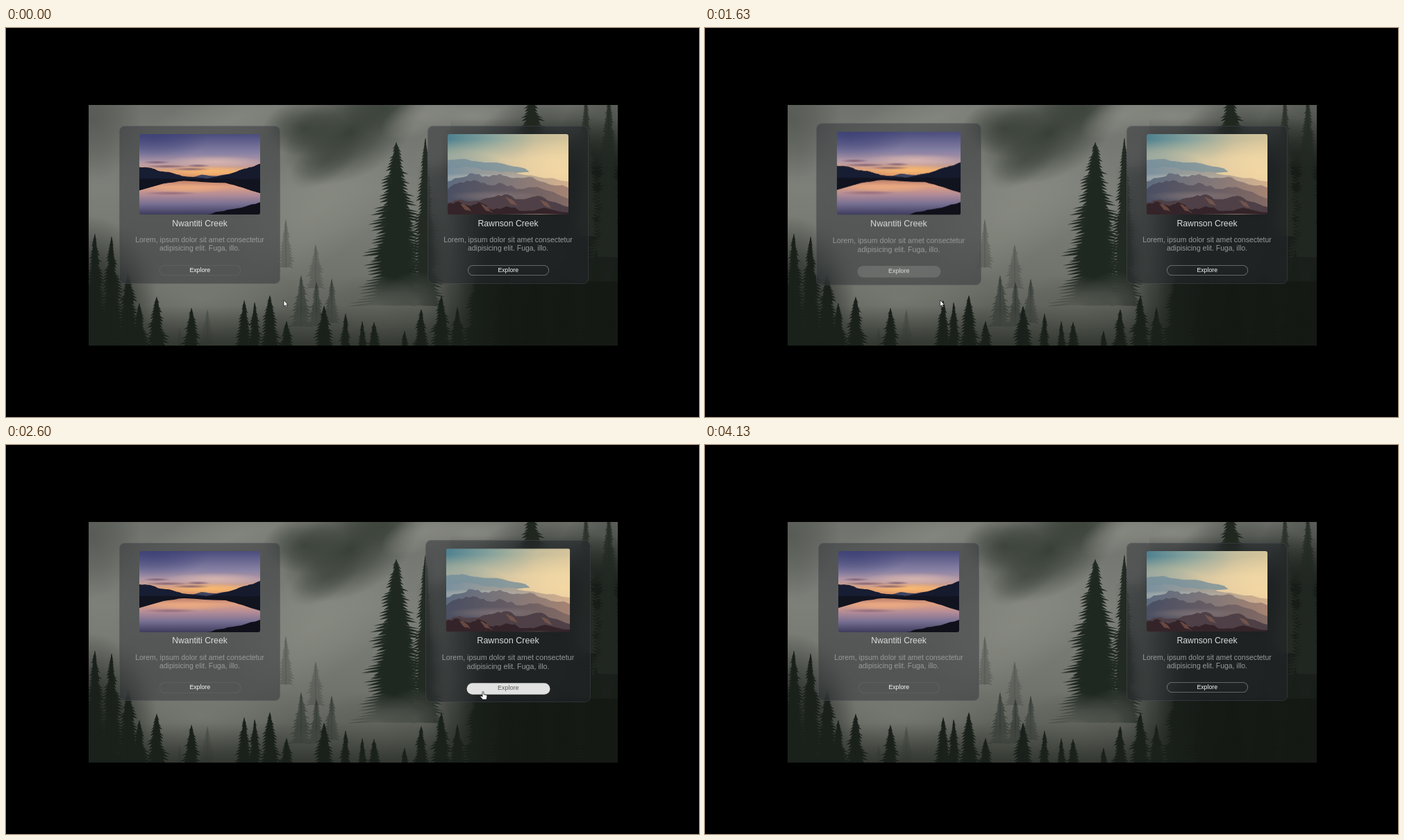
Recreate the animation shown at these times as an HTML page with a canvas. Size 998 px wide and 561 px high, loop 4160 ms.

```html
<!DOCTYPE html>
<html lang="en">
<head>
<meta charset="utf-8">
<title>Creek cards</title>
<style>
html, body { margin: 0; width: 100%; height: 100%; overflow: hidden; background: #000; }
body { position: relative; font-family: Arial, "Liberation Sans", sans-serif; }
#stage { position: absolute; left: 119px; top: 110.5px; width: 762px; height: 347px; overflow: hidden; }
#stage > canvas { position: absolute; left: 0; top: 0; }
.card {
  position: absolute; top: 30px; width: 232px; height: 228px; border-radius: 8px;
  background: rgba(37, 39, 47, .42); backdrop-filter: blur(10px);
  box-shadow: inset 0 0 0 .7px rgba(160, 165, 180, .2); text-align: center;
}
.card > * { position: absolute; margin: 0; font-weight: 400; }
.card canvas { left: 28.8px; top: 12.3px; width: 174.5px; height: 116.5px; border-radius: 3px; }
h3 { left: 0; right: 0; top: 134.2px; font-size: 12.25px; line-height: 14px; color: #dcdddf; }
p { left: 0; right: 0; top: 159.8px; font-size: 10.45px; line-height: 12px; color: #999a9b; }
.button {
  left: 58px; top: 201px; width: 116.5px; height: 15.6px; border-radius: 8px;
  font-size: 8.75px; line-height: 15.6px;
}
#cursor { position: absolute; left: 0; top: 0; width: 14px; height: 16px; overflow: visible; }
#cursor path { fill: #fff; stroke: #111; stroke-width: .7; }
</style>
</head>
<body>
<div id="stage">
  <canvas id="forest" width="762" height="347"></canvas>
  <div class="card" style="left:44px">
    <canvas id="lake" width="350" height="234"></canvas>
    <h3>Nwantiti Creek</h3>
    <p>Lorem, ipsum dolor sit amet consectetur<br>adipisicing elit. Fuga, illo.</p>
    <div class="button">Explore</div>
  </div>
  <div class="card" style="left:488px">
    <canvas id="ridges" width="350" height="234"></canvas>
    <h3>Rawnson Creek</h3>
    <p>Lorem, ipsum dolor sit amet consectetur<br>adipisicing elit. Fuga, illo.</p>
    <div class="button">Explore</div>
  </div>
  <svg id="cursor">
    <path id="arrow" d="M0 0V9L2 7.2 3.4 10.3 4.8 9.7 3.5 6.7H6.2Z"/>
    <path id="hand" d="M-1 .8Q0-.6 1 .8V4.2L5 5Q6 5.3 5.8 7L5 11.5H-.6L-3.8 7.4Q-3.6 6-2.4 6.4L-1 7.6Z"/>
  </svg>
</div>
<script>
const $ = id => document.getElementById(id);
let seed = 7;
const random = () => (seed = seed * 16807 % 2147483647) / 2147483647;

function gradient(c, x0, y0, x1, y1, stops) {
  const g = c.createLinearGradient(x0, y0, x1, y1);
  stops.forEach(([at, color]) => g.addColorStop(at, color));
  return g;
}

function fill(c, style, x, y, w, h) {
  c.fillStyle = style;
  c.fillRect(x, y, w, h);
}

// Soft ellipse fading out to its edge
function blob(c, x, y, rx, ry, rgb, alpha, turn = 0) {
  c.save();
  c.translate(x, y);
  c.rotate(turn);
  c.scale(rx, ry);
  const g = c.createRadialGradient(0, 0, 0, 0, 0, 1);
  g.addColorStop(0, `rgba(${rgb},${alpha})`);
  g.addColorStop(.5, `rgba(${rgb},${alpha * .6})`);
  g.addColorStop(1, `rgba(${rgb},0)`);
  fill(c, g, -1, -1, 2, 2);
  c.restore();
}

function tree(c, x, top, base, half, color) {
  const rows = Math.round((base - top) / 4.5);
  c.fillStyle = color;
  for (const side of [-1, 1]) {
    c.beginPath();
    c.moveTo(x - side * .6, top);
    for (let i = 1; i <= rows; i++) {
      const y = top + (base - top) * i / rows;
      const w = half * (i / rows) ** .8 * (.6 + .5 * random());
      c.lineTo(x + side * w, y + 1);
      c.lineTo(x + side * w * .5, y - .5);
    }
    c.lineTo(x - side * .6, base);
    c.fill();
  }
}

function drawForest() {
  const c = $("forest").getContext("2d");
  const fog = "137,139,131", dark = "22,27,23", green = "52,60,51";
  c.translate(-119, -110.5);
  fill(c, gradient(c, 0, 111, 0, 458, [[0, "#70736d"], [.35, "#7d8079"], [.7, "#71746c"], [1, "#4c5049"]]), 119, 110, 762, 348);
  blob(c, 125, 130, 70, 90, "70,74,69", .6);
  blob(c, 330, 130, 150, 45, fog, .7, -.3);
  blob(c, 450, 255, 150, 75, fog, .8, -.6);
  blob(c, 280, 390, 130, 60, fog, .45);
  blob(c, 430, 145, 60, 40, green, .8);
  blob(c, 495, 150, 105, 65, green, .95, -.5);
  blob(c, 545, 115, 60, 40, green, .7);
  blob(c, 460, 190, 60, 30, green, .45, -.6);
  blob(c, 600, 125, 65, 28, fog, .8, -.4);
  blob(c, 670, 125, 80, 28, fog, .85);
  blob(c, 118, 400, 100, 130, dark, .95);

  for (const [x, top, base, half] of [[403, 275, 345, 14], [446, 312, 375, 18], [290, 405, 462, 14], [250, 432, 462, 8]])
    tree(c, x, top, base, half, "rgba(66,72,65,.4)");
  for (const [x, top, base, half] of [[425, 356, 430, 20], [447, 366, 430, 16], [469, 361, 425, 15]])
    tree(c, x, top, base, half, "rgba(46,53,47,.62)");
  blob(c, 440, 430, 60, 25, "95,98,90", .5);

  // Dark slope on the right
  fill(c, gradient(c, 590, 0, 690, 0, [[0, "rgba(22,27,23,0)"], [1, "rgba(22,27,23,.93)"]]), 590, 200, 300, 258);
  fill(c, gradient(c, 0, 130, 0, 215, [[0, "rgba(24,29,25,0)"], [1, "rgba(24,29,25,.9)"]]), 640, 130, 250, 80);
  blob(c, 775, 210, 120, 110, dark, .95);
  blob(c, 870, 240, 90, 170, dark, .85);
  tree(c, 757, 88, 250, 50, "#20271f");
  tree(c, 835, 96, 300, 26, "rgba(40,46,38,.8)");
  tree(c, 868, 100, 330, 34, "rgba(34,40,34,.8)");

  tree(c, 604, 158, 400, 30, "#222a23");
  tree(c, 562, 164, 400, 66, "#222b24");
  tree(c, 562, 172, 380, 44, "#1e2720");
  blob(c, 530, 405, 75, 50, "96,99,91", .95);
  blob(c, 590, 395, 50, 45, "88,92,84", .7);
  fill(c, gradient(c, 0, 400, 0, 458, [[0, "rgba(38,43,37,0)"], [1, "rgba(38,43,37,.65)"]]), 119, 400, 762, 58);

  for (const [x, top, base, half] of [
    [128, 296, 470, 32], [152, 300, 470, 30], [176, 352, 470, 30], [192, 396, 470, 20],
    [217, 387, 462, 22], [267, 403, 464, 18], [343, 392, 464, 17], [358, 395, 464, 15],
    [380, 385, 464, 22], [404, 422, 466, 16], [458, 400, 464, 20], [489, 411, 464, 12],
    [513, 422, 464, 10], [530, 423, 464, 13], [574, 436, 464, 9], [598, 405, 464, 17],
    [627, 385, 464, 22], [650, 402, 464, 18], [682, 340, 470, 36]
  ]) tree(c, x, top, base, half, "#1a211b");
  for (const [x, top] of [[720, 335], [760, 350], [805, 330], [850, 320], [878, 340]])
    tree(c, x, top, 475, 36, "#181e18");
  fill(c, gradient(c, 650, 0, 740, 0, [[0, "rgba(19,23,18,0)"], [1, "rgba(19,23,18,.75)"]]), 650, 365, 235, 95);
}

// Filled outline through [x, y] points, with small seeded bumps between them
function land(c, points, color, bump = 1) {
  c.fillStyle = color;
  c.beginPath();
  points.forEach(([x, y], i) => {
    if (!i) return c.moveTo(x, y);
    const [px, py] = points[i - 1];
    for (let k = 1; k <= 4; k++)
      c.lineTo(px + (x - px) * k / 4, py + (y - py) * k / 4 + (k < 4 ? (random() - .5) * bump : 0));
  });
  c.fill();
}

function photo(id) {
  const c = $(id).getContext("2d");
  c.scale(2, 2);
  return c;
}

function drawLake() {
  const c = photo("lake");
  fill(c, gradient(c, 0, 0, 0, 66, [[0, "#4b4d7e"], [.4, "#8680a4"], [.65, "#b79ba6"], [.83, "#e3a577"], [1, "#d98b5c"]]), 0, 0, 175, 66);
  blob(c, 20, 5, 80, 35, "50,56,110", .55);
  blob(c, 110, 40, 70, 9, "235,196,180", .65);
  blob(c, 105, 54, 60, 8, "255,190,110", .8);
  for (const [x, y, r] of [[40, 47, 32], [75, 51, 28], [25, 41, 20], [85, 46, 18]])
    blob(c, x, y, r, 2.4, "112,80,104", .75);
  fill(c, gradient(c, 0, 66, 0, 117, [[0, "#b87a62"], [.2, "#e0a184"], [.45, "#b08b98"], [.7, "#777093"], [1, "#3e3c5e"]]), 0, 66, 175, 51);
  blob(c, 70, 79, 65, 7, "242,176,126", .7);
  blob(c, 45, 86, 40, 3, "125,88,110", .6);
  land(c, [[60, 67], [90, 59], [112, 61], [140, 57], [175, 67]], "#3d435e");
  land(c, [[0, 67], [0, 48], [16, 49], [30, 54], [46, 56], [62, 61], [95, 64], [95, 67]], "#171d32");
  land(c, [[80, 67], [106, 63], [130, 58], [150, 51], [162, 48], [175, 43], [175, 69]], "#151a2d");
  land(c, [[0, 65], [80, 65.5], [175, 65], [175, 86], [150, 78], [125, 71], [65, 68], [35, 72], [0, 82]], "#11131f");
  land(c, [[98, 117], [122, 112], [148, 107], [175, 99], [175, 117]], "#10101a", 2);
}

function drawRidges() {
  const c = photo("ridges");
  fill(c, gradient(c, 0, 0, 175, 40, [[0, "#4f8190"], [.35, "#87a39d"], [.7, "#c5bd9c"], [1, "#d8c69b"]]), 0, 0, 175, 117);
  fill(c, gradient(c, 0, 8, 0, 75, [[0, "rgba(236,210,165,0)"], [.45, "rgba(236,210,165,.75)"], [1, "rgba(221,190,154,.9)"]]), 0, 8, 175, 109);
  blob(c, 165, 55, 80, 50, "247,220,166", .8);
  blob(c, 0, 50, 90, 28, "118,149,160", .75);
  const haze = (top, bottom) => gradient(c, 0, 35, 175, 100, [[0, top], [1, bottom]]);
  land(c, [[0, 38], [22, 36], [45, 40], [80, 43], [112, 50], [118, 55], [0, 60]], "rgba(112,139,154,.75)", 2);
  land(c, [[0, 50], [25, 47], [60, 53], [95, 55], [130, 62], [175, 69], [175, 90], [0, 90]], haze("#7790a0", "#d9b18b"), 3);
  blob(c, 45, 64, 80, 7, "184,187,181", .75);
  land(c, [[0, 69], [20, 63], [36, 57], [55, 61], [76, 58], [95, 64], [118, 62], [140, 70], [175, 78], [175, 117], [0, 117]], haze("#586a80", "#a88472"), 4);
  land(c, [[0, 80], [18, 70], [38, 67], [58, 74], [80, 72], [105, 80], [130, 77], [175, 94], [175, 117], [0, 117]], haze("#454d63", "#846b65"), 4);
  blob(c, 70, 90, 70, 8, "148,132,130", .5);
  land(c, [[0, 99], [20, 95], [40, 97], [65, 92], [82, 88], [103, 95], [130, 90], [150, 98], [175, 106], [175, 117], [0, 117]], "#4e4046", 4);
  land(c, [[0, 102], [16, 98], [30, 104], [45, 99], [66, 110], [85, 105], [110, 112], [140, 107], [175, 114], [175, 117], [0, 117]], "#342429", 4);
  for (const [x, y] of [[18, 101], [48, 102], [84, 92], [133, 95]])
    land(c, [[x, y], [x + 10, y + 4], [x + 18, y + 13], [x + 7, y + 9]], "rgba(138,98,82,.6)", 2);
}

const LOOP = 4160;
// time, x, y of the pointer tip
const path = [[0, 400, 392], [30, 400, 392], [340, 297, 350], [1470, 297, 350], [1630, 338, 392],
  [2070, 630, 405], [2300, 630, 405], [2420, 687, 355], [3500, 687, 355], [3700, 727, 419], [3850, 748, 470]];
// rise start, rise end, fall start, fall end
const lifts = [[195, 450, 1600, 1930], [2380, 2590, 3580, 3900]];
const glows = [[270, 510, 1480, 1680], [2410, 2620, 3540, 3745]];

const ramp = (t, a, b) => {
  const k = Math.min(1, Math.max(0, (t - a) / (b - a)));
  return k * k * (3 - 2 * k);
};
const pulse = (t, [a, b, c, d]) => ramp(t, a, b) - ramp(t, c, d);
const mix = (a, b, k) => a + (b - a) * k;

function pointer(t) {
  const i = path.findIndex(p => p[0] > t);
  if (i < 0) return path[path.length - 1].slice(1);
  const [t0, x0, y0] = path[i - 1], [t1, x1, y1] = path[i];
  const k = (t - t0) / (t1 - t0);
  return [mix(x0, x1, k), mix(y0, y1, k)];
}

const cards = [...document.querySelectorAll(".card")];
const buttons = [...document.querySelectorAll(".button")];

function frame(now) {
  const t = now % LOOP;
  cards.forEach((card, i) => {
    const lift = pulse(t, lifts[i]), glow = pulse(t, glows[i]);
    card.style.transform = `translateY(${-lift}px) scale(${1 + .026 * lift})`;
    const ink = mix(250, 88, glow);
    const edge = i ? "150,152,155" : "122,123,122";
    buttons[i].style.color = `rgb(${ink},${ink},${ink})`;
    buttons[i].style.background = `rgba(236,236,236,${.97 * glow})`;
    buttons[i].style.boxShadow = `inset 0 0 0 .8px rgba(${edge},${(i ? .75 : .35) * (1 - glow)})`;
  });
  const [x, y] = pointer(t);
  const pressing = y < 358.5;
  $("cursor").style.transform = `translate(${x - 119}px,${y - 110.5}px)`;
  $("arrow").style.display = pressing ? "none" : "";
  $("hand").style.display = pressing ? "" : "none";
  requestAnimationFrame(frame);
}

drawForest();
drawLake();
drawRidges();
requestAnimationFrame(frame);
</script>
</body>
</html>
```
